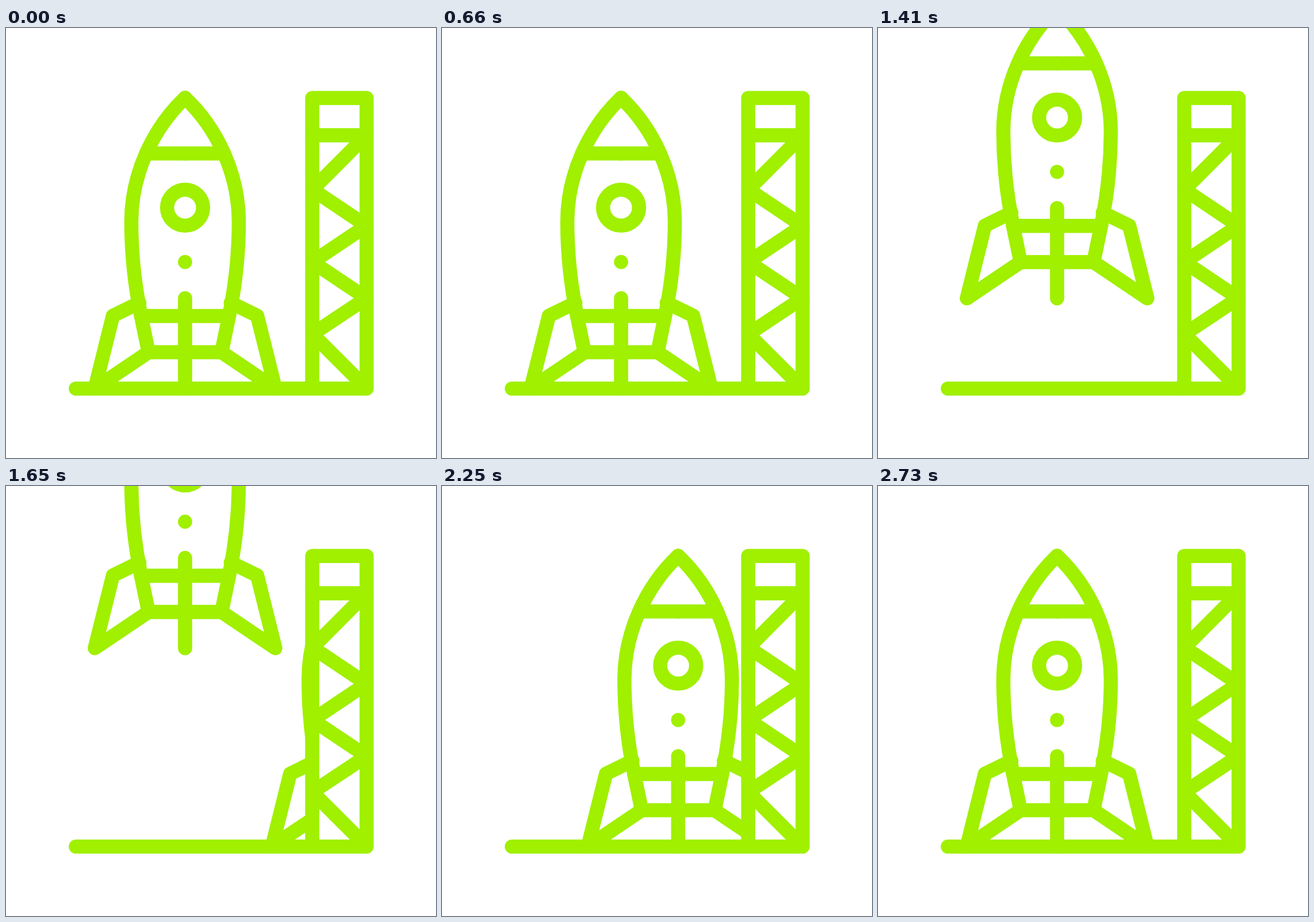
An HTML page for the animation above (3.6 s loop, 748 by 748 pixels).

```html
<!DOCTYPE html>
<html lang="en">
<head>
<meta charset="utf-8">
<title>Rocket launch</title>
<style>
  html, body { margin: 0; height: 100%; overflow: hidden; background: #fff; }
  svg { display: block; width: 100vw; height: 100vh; }
</style>
</head>
<body>
<svg viewBox="0 0 748 748" fill="none" stroke="#a0f000" stroke-width="24.6" stroke-linecap="round" stroke-linejoin="round">
  <defs>
    <clipPath id="leftOfTower"><path d="M0 0H532V748H0Z"/></clipPath>
    <g id="half">
      <path d="M311.5 121.5C255 175 218 255 218 337C218 395 224 448 235 501L248 564"/>
      <path d="M232 478L186 500.5L154.5 627L248 564"/>
      <path d="M244 218.3H311.5M235 501H311.5M248 564H311.5"/>
    </g>
    <g id="rocket">
      <use href="#half"/>
      <use href="#half" transform="translate(623 0) scale(-1 1)"/>
      <circle cx="311.5" cy="312.5" r="31.3"/>
      <path d="M311.5 407h0M311.5 470V627"/>
    </g>
  </defs>
  <g clip-path="url(#leftOfTower)">
    <use id="departing" href="#rocket"/>
    <use id="arriving" href="#rocket"/>
  </g>
  <path d="M121.5 627.3H627.3V121.8H532.7V627"/>
  <path d="M533 186.6H627L533 281L627 344L533 407L627 470L533 532.5L627 626.5"/>
</svg>
<script>
  const LOOP = 3600, STEP = 30;
  const SHAKE_END = 1140, LIFTOFF = 823;
  const ARRIVE_START = 1150, ARRIVE_END = 2730, ARRIVE_DISTANCE = 414;
  const departing = document.getElementById('departing');
  const arriving = document.getElementById('arriving');

  const place = (node, x, y) => node.setAttribute('transform', `translate(${x} ${y})`);

  function draw(time) {
    const t = Math.floor(time % LOOP / STEP) * STEP;

    // The engines rattle the rocket until it has cleared the ground.
    const shake = t < SHAKE_END ? Math.sin(t * Math.PI / 60) : 0;
    const climb = (Math.max(0, t - LIFTOFF) * 0.01534) ** 2.3;
    place(departing, 5 * shake, -7 * Math.abs(shake) - climb);

    // The next rocket rolls out from behind the tower.
    const left = Math.min(1, Math.max(0, (ARRIVE_END - t) / (ARRIVE_END - ARRIVE_START)));
    const eased = 0.77 * left * left * (3 - 2 * left) + 0.23 * left;
    place(arriving, ARRIVE_DISTANCE * eased, 0);
    arriving.style.display = t < ARRIVE_START ? 'none' : '';
  }

  const start = performance.now();
  function tick() {
    draw(performance.now() - start);
    requestAnimationFrame(tick);
  }
  tick();
</script>
</body>
</html>
```
